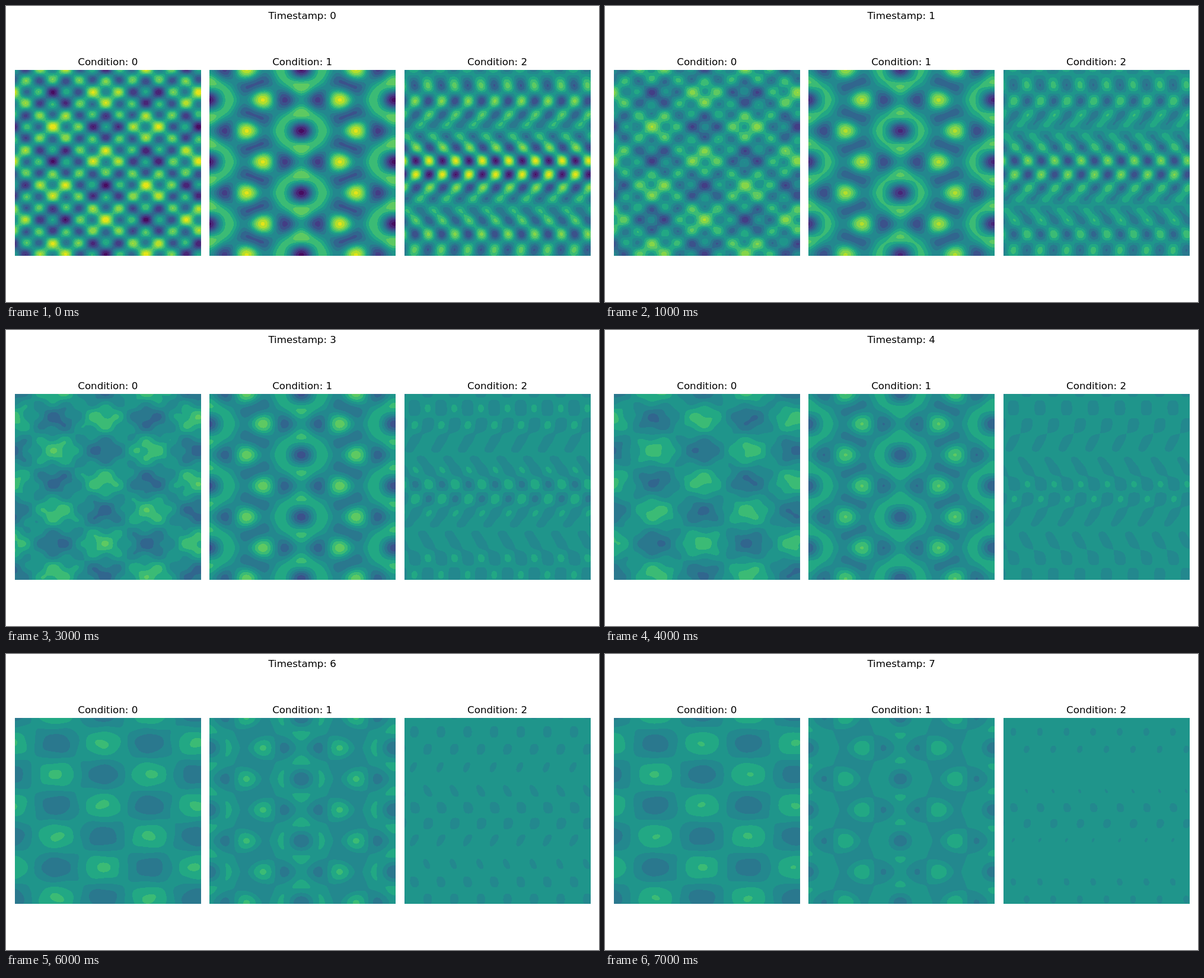
These frames come from a looping animation (1000 by 500 pixels, 8000 ms). An HTML page with a canvas:

```html
<!DOCTYPE html>
<html lang="en">
<head>
<meta charset="utf-8">
<title>Diffusing fields</title>
<style>
  html, body { margin: 0; width: 1000px; height: 500px; overflow: hidden; background: #fff; }
  canvas, svg { position: absolute; left: 0; top: 0; display: block; }
  text { font: 16.67px "DejaVu Sans", sans-serif; text-anchor: middle; fill: #000; }
</style>
</head>
<body>
<canvas id="fields" width="1000" height="500"></canvas>
<svg width="1000" height="500" viewBox="0 0 1000 500">
  <text id="stamp" x="499.7" y="22"></text>
  <text x="171.8" y="100">Condition: 0</text>
  <text x="499.7" y="100">Condition: 1</text>
  <text x="828.6" y="100">Condition: 2</text>
</svg>
<script>
const SIZE = 314, TOP = 108, STEP = 1000, STEPS = 8;
const VISCOSITY = 0.005, BIAS = 0.513;
const UNIT = 2 * Math.PI / SIZE;
const BANDS = ['470d60', '482677', '433e85', '3b528b', '31668e', '2a788e', '23888e',
  '1f958b', '22a884', '3bbb75', '5ec962', '86d549', 'b5de2b', 'e5e419']
  .map(hex => [0, 2, 4].map(i => parseInt(hex.substr(i, 2), 16)));

// Each mode is amp * cos(kx (x - x0)) * cos(ky (y - y0)), with x0 and y0 on the stage.
const mode = (amp, kx, x0, ky, y0) => ({ amp, kx, x0, ky, y0 });
// Same, but a sine in y around y0.
const odd = (amp, kx, x0, ky, y0) => mode(amp, kx, x0, ky, y0 + SIZE / ky / 4);

const panels = [
  { left: 15, modes: [
    mode(-0.213, 2, 85, 3, 151),
    mode(0.28, 7, 11.4, 8, 106) ] },
  { left: 343, modes: [
    mode(-0.235, 5, 498, 3, 211),
    mode(-0.235, 2, 498, 6, 211) ] },
  { left: 672, modes: [
    odd(0.2, 7, 688, 5, 273),
    odd(0.15, 7, 693, 7, 273),
    odd(0.15, 7, 693, 8, 273) ] }
];

const ctx = document.getElementById('fields').getContext('2d');
const stamp = document.getElementById('stamp');

function wave(k, start, origin) {
  return Float64Array.from({ length: SIZE },
    (_, i) => Math.cos(k * UNIT * (start + i + 0.5 - origin)));
}

for (const panel of panels) {
  panel.image = ctx.createImageData(SIZE, SIZE);
  for (const m of panel.modes) {
    m.across = wave(m.kx, panel.left, m.x0);
    m.down = wave(m.ky, TOP, m.y0);
  }
}

function drawPanel({ left, modes, image }, time) {
  const data = image.data;
  const amps = modes.map(m =>
    m.amp * Math.exp(-VISCOSITY * (m.kx * m.kx + m.ky * m.ky) * time));
  let p = 0;
  for (let y = 0; y < SIZE; y++) {
    const row = modes.map((m, i) => amps[i] * m.down[y]);
    for (let x = 0; x < SIZE; x++) {
      let value = BIAS;
      for (let i = 0; i < modes.length; i++) value += row[i] * modes[i].across[x];
      const band = Math.floor(value * BANDS.length);
      const color = BANDS[Math.max(0, Math.min(BANDS.length - 1, band))];
      data[p++] = color[0];
      data[p++] = color[1];
      data[p++] = color[2];
      data[p++] = 255;
    }
  }
  ctx.putImageData(image, left, TOP);
}

let shown = -1;
function render(ms) {
  const time = Math.floor(ms / STEP) % STEPS;
  if (time === shown) return;
  shown = time;
  stamp.textContent = 'Timestamp: ' + time;
  panels.forEach(panel => drawPanel(panel, time));
}

const start = performance.now();
function tick() {
  render(performance.now() - start);
  requestAnimationFrame(tick);
}
tick();
</script>
</body>
</html>
```
